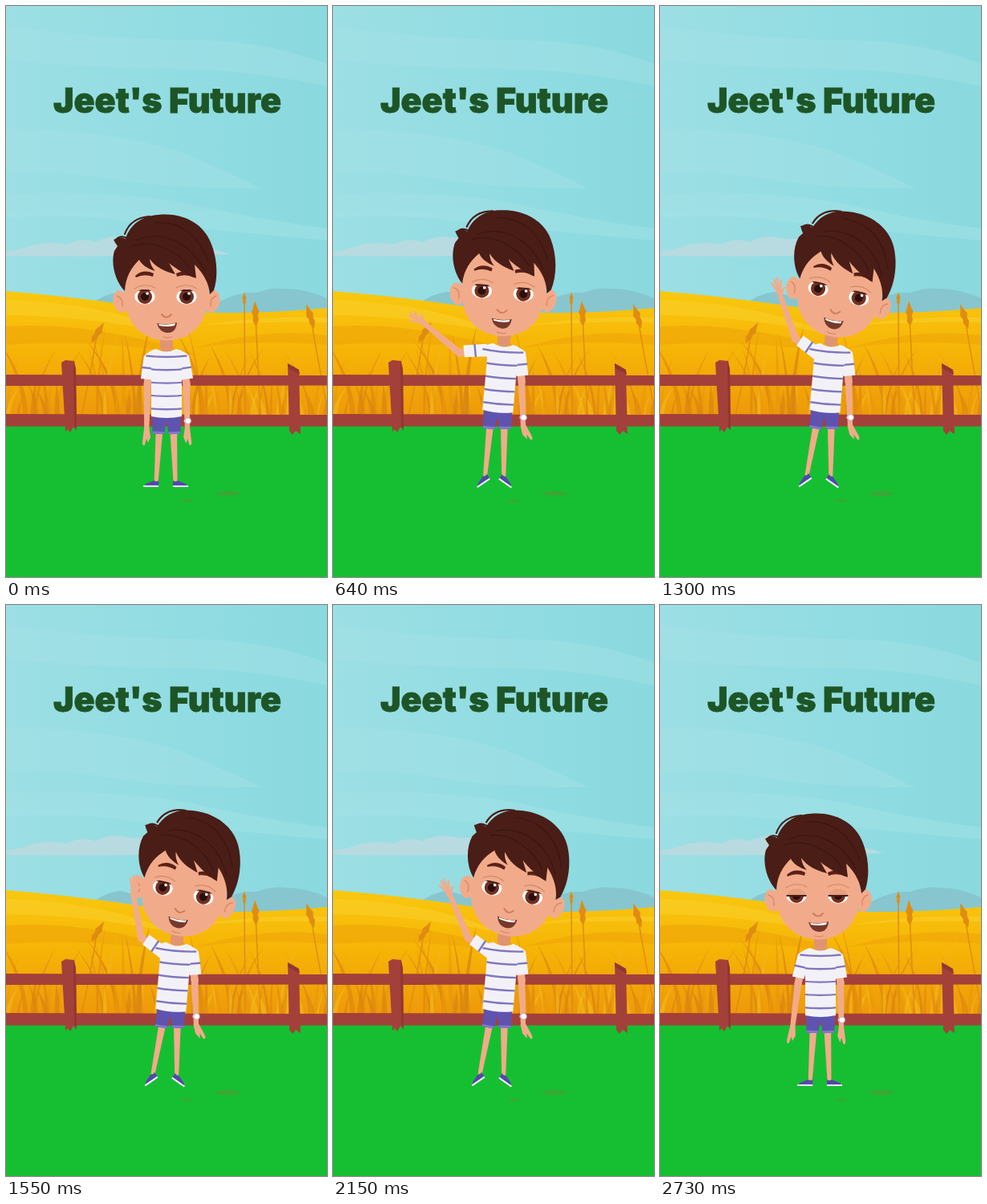
Write an HTML page that moves like this. It is 400x711 px and loops after 2760 ms.

```html
<!DOCTYPE html>
<html lang="en">
<head>
<meta charset="utf-8">
<title>Waving boy</title>
<style>
html, body { margin: 0; width: 100%; height: 100%; overflow: hidden; background: #16bf31; }
svg { display: block; width: 100%; height: 100%; }
.title { font: 900 43px Inter, sans-serif; fill: #1d5526; stroke: #1d5526; stroke-width: .8; text-anchor: middle; }
.hips, .torso { transform-origin: 200px 515px; }
.head { transform-origin: 200px 420px; }
.armL { transform-origin: 180px 435px; }
.armR { transform-origin: 220px 435px; }
.foreL { transform-origin: 180px 471px; }
.foreR { transform-origin: 220px 471px; }
.handL { transform-origin: 180px 527px; }
.handR { transform-origin: 220px 527px; }
.legL { transform-origin: 191px 520px; }
.legR { transform-origin: 209px 520px; }
.shoeL { transform-origin: 191px 592px; }
.shoeR { transform-origin: 209px 592px; }
.skin { fill: #f2ab8a; }
.shirt { fill: #f3f1f8; }
.stripe { fill: none; stroke: #7f78bd; stroke-width: 2.4; }
.hair { fill: #4a1d17; }
.line { fill: none; stroke-linecap: round; stroke-linejoin: round; }
.shorts { fill: #5f53b0; }
.shoe { fill: #5546ab; }
</style>
</head>
<body>
<svg viewBox="0 0 400 711" preserveAspectRatio="none">
  <defs>
    <linearGradient id="sky">
      <stop stop-color="#9cdfe4"/><stop offset=".6" stop-color="#90dce2"/><stop offset="1" stop-color="#8ad9df"/>
    </linearGradient>
    <linearGradient id="field" x2="0" y2="1">
      <stop stop-color="#f9c80f"/><stop offset=".45" stop-color="#f6b406"/><stop offset="1" stop-color="#ec940a"/>
    </linearGradient>
    <clipPath id="shirtClip"><path id="shirtShape" d="M187 427Q200 434 212 427Q222 429 226 436L219 446V511Q200 515 181 511V446L174 436Q178 429 187 427Z"/></clipPath>
    <clipPath id="eyeClip"><ellipse cx="173" cy="362" rx="12.5" ry="9.5"/><ellipse cx="225" cy="362" rx="12.5" ry="9.5"/></clipPath>
  </defs>

  <rect width="400" height="390" fill="url(#sky)"/>
  <g fill="#a5e2e7" opacity=".45">
    <path d="M0 25Q120 42 255 43Q330 46 400 72V100Q290 76 180 78Q80 76 0 66Z"/>
    <path d="M0 154Q110 150 215 181Q270 203 318 227Q200 228 110 212Q50 205 0 208Z"/>
    <path d="M0 235Q150 227 250 251Q330 268 400 277V292Q250 278 150 268Q70 257 0 264Z"/>
  </g>
  <path d="M0 306Q20 303 36 297Q58 293 76 297Q92 288 112 294Q130 283 158 290Q182 288 200 299Q250 298 278 309Q140 313 0 311Z" fill="#b7dbe0"/>
  <path d="M105 372Q125 357 143 356Q200 372 262 370Q290 355 312 357Q332 350 348 352Q374 352 400 364V390H105Z" fill="#87c6cf"/>

  <path d="M0 355Q75 361 150 372Q220 383 290 382Q350 381 400 376V525H0Z" fill="url(#field)"/>
  <path d="M0 366Q130 371 205 407Q100 386 0 385ZM240 398Q320 385 400 388V394Q320 392 240 398Z" fill="#fbd02c" opacity=".55"/>
  <path d="M0 399Q110 392 245 436Q110 414 0 422ZM230 427Q320 400 400 410V422Q310 414 230 427Z" fill="#f0a507" opacity=".6"/>
  <g id="wheat"></g>
  <g id="ears" fill="#de8d12"></g>

  <rect y="523" width="400" height="188" fill="#16bf31"/>
  <g fill="#a4403a">
    <path d="M0 459L400 460V472.500L0 473ZM0 508L400 509V523.500H0Z"/>
    <path d="M69 444L74 441L85 442L87 452L88 529L84 524L80 531L77 527L74 530ZM351 445L365 453L367 533L361 529L357 534L353 529Z"/>
    <path d="M84 442L87 452L88 525L85 524ZM351 445L365 453L366 459L352 451Z" fill="#933632"/>
  </g>
  <g fill="#4d9b36" opacity=".65"><ellipse cx="276" cy="607" rx="15" ry="3"/><ellipse cx="225" cy="616" rx="7" ry="1.800"/></g>
  <text class="title" x="201" y="133">Jeet's Future</text>

  <g class="hips">
    <g class="legL">
      <path class="skin" d="M187 525H196L193.500 592H188.500Z"/>
      <g class="shoeL"><path class="shoe" d="M188 591Q191 593 194 591V598H176Q176 595 183 593Z"/><path d="M175 598H194" stroke="#f3f1fb" stroke-width="2"/></g>
      <path class="shorts" d="M182 510H200L198 533H183Z"/><path d="M183 531.500H198" stroke="#8179c9" stroke-width="3"/>
    </g>
    <g class="legR">
      <path class="skin" d="M204 525H213L211.500 592H206.500Z"/>
      <g class="shoeR"><path class="shoe" d="M212 591Q209 593 206 591V598H224Q224 595 217 593Z"/><path d="M206 598H225" stroke="#f3f1fb" stroke-width="2"/></g>
      <path class="shorts" d="M200 510H218L217 533H202Z"/><path d="M202 531.500H217" stroke="#8179c9" stroke-width="3"/>
    </g>
    <path class="shorts" d="M183 508H217V516L200 520L183 516Z"/>
  </g>

  <g class="torso"><path d="M192 406H208V427Q200 435 192 427Z" fill="#e09472"/></g>

  <g class="head">
    <g class="skin"><ellipse cx="143" cy="368" rx="9.5" ry="14" transform="rotate(-12 143 368)"/><ellipse cx="257" cy="368" rx="9.5" ry="14" transform="rotate(12 257 368)"/></g>
    <path class="line" d="M138 361Q146 363 145 374M262 361Q254 363 255 374" stroke="#d58a69" stroke-width="1.4"/>
    <path class="skin" d="M148 325C146 368 148 391 168 406C186 420 214 420 232 406C252 391 254 368 252 325C250 285 150 285 148 325Z"/>
    <path class="line" d="M160 352Q173 344 186 351M212 351Q225 344 238 352" stroke="#d28866" stroke-width="1.2"/>
    <g clip-path="url(#eyeClip)">
      <path d="M155 350H245V375H155Z" fill="#fff"/>
      <g fill="#713021"><circle cx="173" cy="362" r="9"/><circle cx="225" cy="362" r="9"/></g>
      <g fill="#2b0f0c"><circle cx="173" cy="362" r="5"/><circle cx="225" cy="362" r="5"/></g>
      <g fill="#fff"><circle cx="176" cy="358" r="1.8"/><circle cx="228" cy="358" r="1.8"/></g>
      <path class="lid" d="M150 325H250V353H150Z" fill="#e99f7c" stroke="#4a1d17" stroke-width="2"/>
    </g>
    <path d="M161 336Q171 327 184 333L183 337Q172 333 162 338ZM212 333Q225 327 236 337L234 338Q224 333 213 337Z" fill="#5a2118"/>
    <path class="line" d="M194 384Q200 391 206 384" stroke="#cf7f5c" stroke-width="2"/>
    <path d="M188 395Q201 398 213 394Q212 407 201 407Q191 406 188 395Z" fill="#77392b"/>
    <path d="M190 396Q201 398 211 395L210 398Q201 400 191 398Z" fill="#fff"/>
    <path class="line" d="M196 412Q201 414 207 412" stroke="#d58a68" stroke-width="1.3"/>
    <path class="hair" d="M148 355C137 344 130 322 135 305L139 299Q136 295 134 291Q143 286 149 290C154 273 169 261 190 260C219 257 243 270 253 290C263 310 265 335 259 354L254 359C253 346 247 334 235 322L237 339C225 335 211 327 203 320L211 334C199 331 187 326 179 315Q180 324 186 330C176 327 169 322 166 316C156 326 149 337 148 355Z"/>
    <path class="line" d="M137 291Q142 285 151 289M148 284C153 270 164 263 179 262" stroke="#4a1d17" stroke-width="2.2"/>
    <path class="line" d="M163 292C190 279 228 291 247 329M157 299C179 290 213 303 229 326M184 270C217 267 240 286 252 318" stroke="#3b1512" stroke-width="1.2"/>
  </g>

  <g class="torso">
    <g class="armR">
      <path class="skin" d="M215 440H225L224.500 474H215.500Z"/>
      <g class="foreR">
        <path class="skin" d="M215.500 469Q220 465 224.500 469L223 528H217Z"/>
        <path class="skin handR" d="M217 525L215 537L218 545L220 539L222 547Q225 549 225 543L223 525Z"/>
        <path d="M216 517H224" stroke="#e9e7ef" stroke-width="3"/><circle cx="221" cy="517" r="3.6" fill="#fff" stroke="#b9b6c4"/>
      </g>
      <path class="shirt" d="M212 433Q221 426 228 437L229 465H214Z"/><path class="stripe" d="M213 451H229"/>
    </g>
    <g class="armL">
      <path class="skin" d="M175 440H185L184.500 474H175.500Z"/>
      <g class="foreL">
        <path class="skin" d="M175.500 470Q180 464 184.500 470L183 529H177Z"/>
        <g class="handL">
          <path class="skin rest" d="M183 525L185 537L182 544L180 539L178 547Q175 549 175 543L177 525Z"/>
          <g class="open">
            <ellipse class="skin" cx="180" cy="532" rx="4.2" ry="6"/>
            <path class="line" d="M179 534L175 546M180 535L179 550M181 535L183 549M182 534L187 545M178 531L173 537" stroke="#f2ab8a" stroke-width="2.5"/>
          </g>
        </g>
      </g>
      <path class="shirt" d="M188 433Q179 426 172 437L171 465H186Z"/><path class="stripe" d="M171 451H187"/>
    </g>
    <use href="#shirtShape" class="shirt"/>
    <g id="stripes" class="stripe" clip-path="url(#shirtClip)"></g>
  </g>
</svg>
<script>
const LOOP = 2760;
const byId = id => document.getElementById(id);

let seed = 11;
const rnd = (a, b) => {
  seed = (seed * 16807) % 2147483647;
  return a + (b - a) * seed / 2147483647;
};

// shirt stripes
for (let y = 435; y < 511; y += 16.3)
  byId('stripes').innerHTML += `<path d="M170 ${y}q30 4 60 0"/>`;

// leaf blades behind the rails, mostly short
const shades = ['#e08a0c', '#f3b51a', '#d98511', '#e99a0b'];
let leaves = '';
for (let i = 0; i < 85; i++) {
  const x = rnd(-5, 405), h = 35 + 85 * rnd(0, 1) ** 2, lean = rnd(-.4, .4) * h, w = rnd(1, 3.5);
  leaves += `<path d="M${x - w} 515q0 ${-h / 2} ${w + lean} ${-h}Q${x + w} ${515 - h / 2} ${x + w} 515Z" fill="${shades[i % 4]}" opacity=".75"/>`;
}
byId('wheat').innerHTML = leaves;

// wheat ear on a curved stem
const ear = (x, y, tilt, size, stem) =>
  `<path d="M${x} ${y}Q${x + stem / 4} ${y + 35} ${x + stem} 510" fill="none" stroke="#de8d12" stroke-width="1.5"/>
   <path d="M0-20L3-10L5-6L3 0L4 5L0 14L-4 6L-3 0L-5-5L-3-10Z" transform="translate(${x} ${y}) rotate(${tilt}) scale(${size})"/>`;
byId('ears').innerHTML =
  ear(113, 409, 32, .9, -19) + ear(311, 386, -3, .95, 6) + ear(380, 389, -18, .95, 22) + ear(297, 366, 0, .5, 1);

// smooth 0..1 ramp from a to b
const ramp = (a, b, t) => {
  const s = Math.min(1, Math.max(0, (t - a) / (b - a)));
  return s * s * (3 - 2 * s);
};
const pose = (part, angle, x = 0, y = 0) => {
  for (const el of document.querySelectorAll('.' + part))
    el.style.transform = `translate(${x}px,${y}px) rotate(${angle}deg)`;
};
const show = (part, on) => { document.querySelector('.' + part).style.opacity = on ? 1 : 0; };

function draw() {
  const t = performance.now() % LOOP;
  const lift = ramp(100, 1000, t) - ramp(2140, 2830, t);
  const lean = ramp(.25, .65, lift);
  const high = lift ** 4;
  const bend = Math.sqrt(lean);
  const tilt = ramp(400, 1000, t) - ramp(2480, 2730, t);
  const wave = .5 - .5 * Math.cos((t - 1060) / 908 * 2 * Math.PI);
  const x = 5 * lean, y = -6.5 * lean;

  pose('hips', 0, x, y);
  pose('torso', 5 * lean, x, y);
  pose('head', 13 * tilt, (12.5 - 4 * wave * high) * lift * lean - 3 * ramp(2500, 2730, t), -5.5 * lean);
  pose('lid', 0, 0, 1 + lean + 8 * ramp(2400, 2730, t));

  pose('armL', 6 + 113 * lift, 7 * high, 7 * high);
  pose('foreL', -5 + bend * (31 + 20 * wave), 0, 0);
  pose('handL', bend * (31 * wave * high - 11));
  pose('armR', -8 - 2 * lean);
  pose('foreR', 7 - 4 * lean);
  pose('handR', -20 * lean);

  pose('legL', 3 + lean + 6.4 * high);
  pose('legR', 2.6 * lean - 1.6);
  pose('shoeL', -3 - 35 * lean - 7 * high);
  pose('shoeR', 1.6 + 32.4 * lean);

  show('open', lift > .1);
  show('rest', lift <= .1);
  requestAnimationFrame(draw);
}
draw();
</script>
</body>
</html>
```
